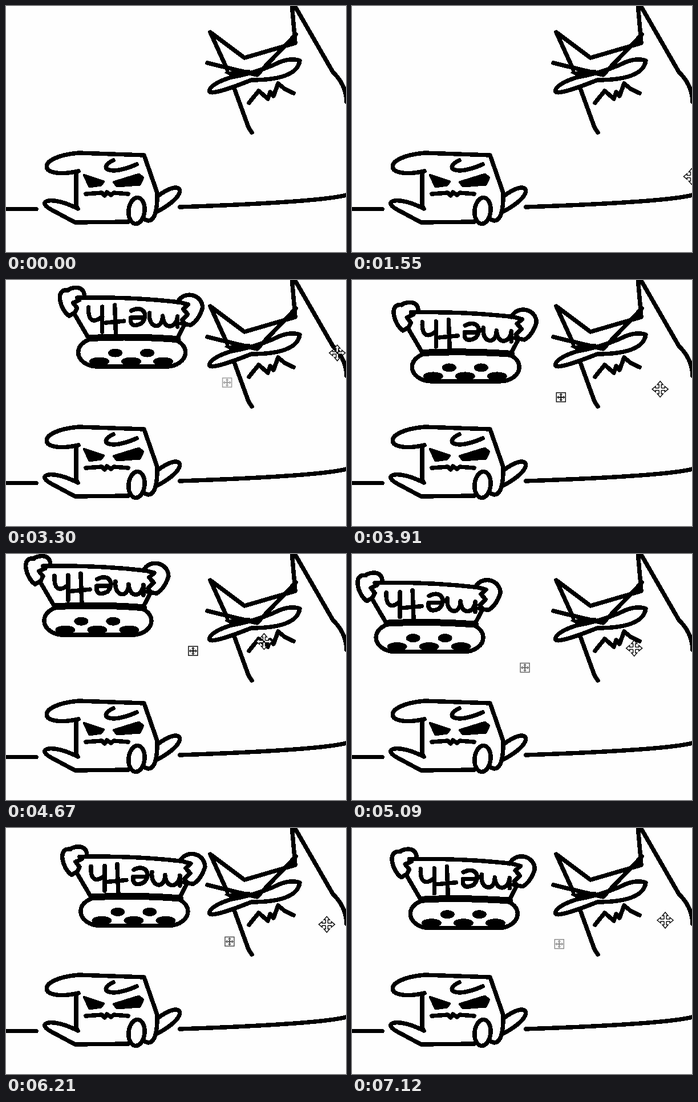
Animation, 596 px wide and 432 px high, one loop 7150 ms. Source, as an HTML page:

```html
<!DOCTYPE html>
<html>
<head>
<meta charset="utf-8">
<style>
html, body { margin: 0; width: 100%; height: 100%; overflow: hidden; background: #fefefe; }
svg { display: block; width: 596px; height: 432px; }
.ink { fill: none; stroke: #000; stroke-width: 7.500; stroke-linecap: round; stroke-linejoin: round; shape-rendering: crispEdges; }
.solid { fill: #000; stroke-width: 3; }
.icon { stroke: #111; stroke-width: 1.500; fill: #fff; }
</style>
</head>
<body>
<svg viewBox="0 0 596 432">
  <g class="ink">
    <!-- ground -->
    <path d="M-9 356.500H53M305 353Q560 344 600 331"/>

    <!-- small creature -->
    <path d="M127 290C55 306 50 264 128 258L242 262L265 328Q266 377 249 377L241 374"/>
    <path d="M123 291V350L126 356C80 332 50 342 80 358L121 380L214 379"/>
    <ellipse cx="229" cy="359.500" rx="14" ry="23" transform="rotate(6 229 359)"/>
    <path d="M266 334C310 300 325 330 265 361"/>
    <path d="M188 271C160 284 180 300 229 278"/>
    <path d="M140 330L168 328L173 333L177 327L184 332L189 328L214 330"/>
    <path class="solid" d="M136 296L172 308L167 315L146 318ZM188 309L233 295L241 301L235 314L194 317Z"/>

    <!-- tall figure -->
    <path d="M388 112L358 46L418 91L507 65L501 -4M353 100L440 121L508 50M504 -4L573 116Q596 138 597 168"/>
    <path class="solid" d="M488 69L507 47V66ZM385 117L426 113L432 120L398 123Z"/>
    <path d="M357 147Q361 136 395 125Q432 119 468 104Q496 89 515 96Q510 130 430 130Q350 162 357 147Z"/>
    <path d="M426 170L443 149L459 163L463 151L469 158L477 136L489 146L504 153"/>
    <path d="M401 147L425 213L431 222"/>
  </g>

  <!-- cup, with its origin at the top left of the left ear -->
  <g id="cup" class="ink">
    <path d="M33 22Q127 20 213 30M46 20C46 -4 17 6 17 9C-6 5 2 42 19 54L29 48"/>
    <path d="M37 26L26 31L33 40L28 50L52 91M209 30C220 8 253 16 253 40Q246 62 232 70L216 67"/>
    <path d="M213 30L228 34L219 42L227 51L217 61L222 68L210 91"/>
    <rect x="35" y="93" width="188" height="50" rx="34" ry="25"/>
    <path d="M55 93Q129 89 209 95" stroke-width="12"/>
    <!-- upside-down lettering -->
    <path d="M53 39C52 66 64 66 77 55M77 38V82M99 35L101 87M83 66L115 63"/>
    <path d="M128 45C148 34 160 52 146 67Q130 75 127 64V57H151"/>
    <path d="M160 49C157 76 183 80 183 54C185 80 207 76 209 55V73"/>
  </g>

  <g id="handle" class="icon">
    <rect x="-8" y="-8" width="16" height="16"/>
    <path d="M-6 0H6M0 -6V6" stroke-width="2"/>
  </g>
  <g id="cursor" class="icon"></g>
</svg>

<script>
const LOOP = 7150;
const LEAD = 80;   // ms by which the pointer runs ahead of the cup
const FADE = 150;  // ms over which a tug on the cup dies away
const [cup, handle, cursor] = ['cup', 'handle', 'cursor'].map(id => document.getElementById(id));

function add(parent, tag, attrs) {
  const el = document.createElementNS('http://www.w3.org/2000/svg', tag);
  for (const name in attrs) el.setAttribute(name, attrs[name]);
  parent.append(el);
}

// Spots zigzag along the rim
for (let i = 0; i < 5; i++) {
  const low = i % 2 === 0;
  add(cup, 'ellipse', { class: 'solid', cx: 72 + 28 * i, cy: low ? 134 : 119, rx: low ? 16 : 11, ry: 6 });
}

// Four arrows: outlines first, then the white shaft joining them
for (let i = 0; i < 4; i++) {
  add(cursor, 'path', { d: 'M-2 -2V-8H-5L0 -14L5 -8H2V-2', transform: `rotate(${90 * i})` });
  add(handle, 'path', { d: 'M-2 -4L0 -6L2 -4', transform: `rotate(${90 * i})` });
}

// Resting points of the shake: time, position, and the tug felt there
const stops = [
  [1900, 640, -130, 0, 0], [2270, 348, -18, -90, 20], [2600, 60, 25, 0, 0],
  [3300, 93, 10, 35, -34], [3910, 68, 35, 14, 4], [4670, 33, 0, -35, 2],
  [5610, 60, 50, 28, 37], [7120, 67, 33, 27, -24], [7400, 80, 30, 0, 0]
].map(([t, x, y, tugX, tugY]) => ({ t, p: [x, y], tug: [tugX, tugY] }));

const pull = (stop, axis, dt) => stop.tug[axis] / LEAD * dt * Math.exp(-Math.abs(dt) / FADE);

// Glide between stops, plus the tugs at both ends and a swing that is still at each stop
function cupAt(t, axis) {
  const i = stops.findIndex(stop => stop.t > t);
  const a = stops[i - 1], b = stops[i];
  const span = b.t - a.t, u = (t - a.t) / span;
  const ease = u * u * (3 - 2 * u);
  const swings = Math.floor(span / 450);
  const swing = (axis ? 24 : 34) * Math.sin(Math.PI * u) * Math.sin(2 * Math.PI * swings * u * (axis ? -1 : 1));
  return a.p[axis] + (b.p[axis] - a.p[axis]) * ease + swing + pull(a, axis, t - a.t) + pull(b, axis, t - b.t);
}

const place = (el, x, y) => el.setAttribute('transform', `translate(${x.toFixed(1)} ${y.toFixed(1)})`);
const show = (el, on) => { el.style.display = on ? '' : 'none'; };

function draw(t) {
  const dragging = t > 1910;
  show(cup, dragging);
  show(handle, dragging);
  show(cursor, dragging || (t >= 1550 && t < 1670));
  if (!dragging) {
    const u = (t - 1550) / 120;
    place(cursor, 596 - 22 * Math.sin(Math.PI * u), 300 - 72 * u);
    return;
  }
  const [x, y] = [0, 1].map(axis => cupAt(t, axis));
  const [leadX, leadY] = [0, 1].map(axis => (cupAt(t + 1, axis) - cupAt(t - 1, axis)) / 2 * LEAD);
  place(cup, x, y);
  place(handle, x + 296, y + 171);
  place(cursor, x + 455 + leadX, y + 153 + leadY);
  handle.setAttribute('opacity', Math.min(1, Math.max(0.4, 1 + leadY / 45)));
}

function tick() {
  draw(performance.now() % LOOP);
  requestAnimationFrame(tick);
}
tick();
</script>
</body>
</html>
```
